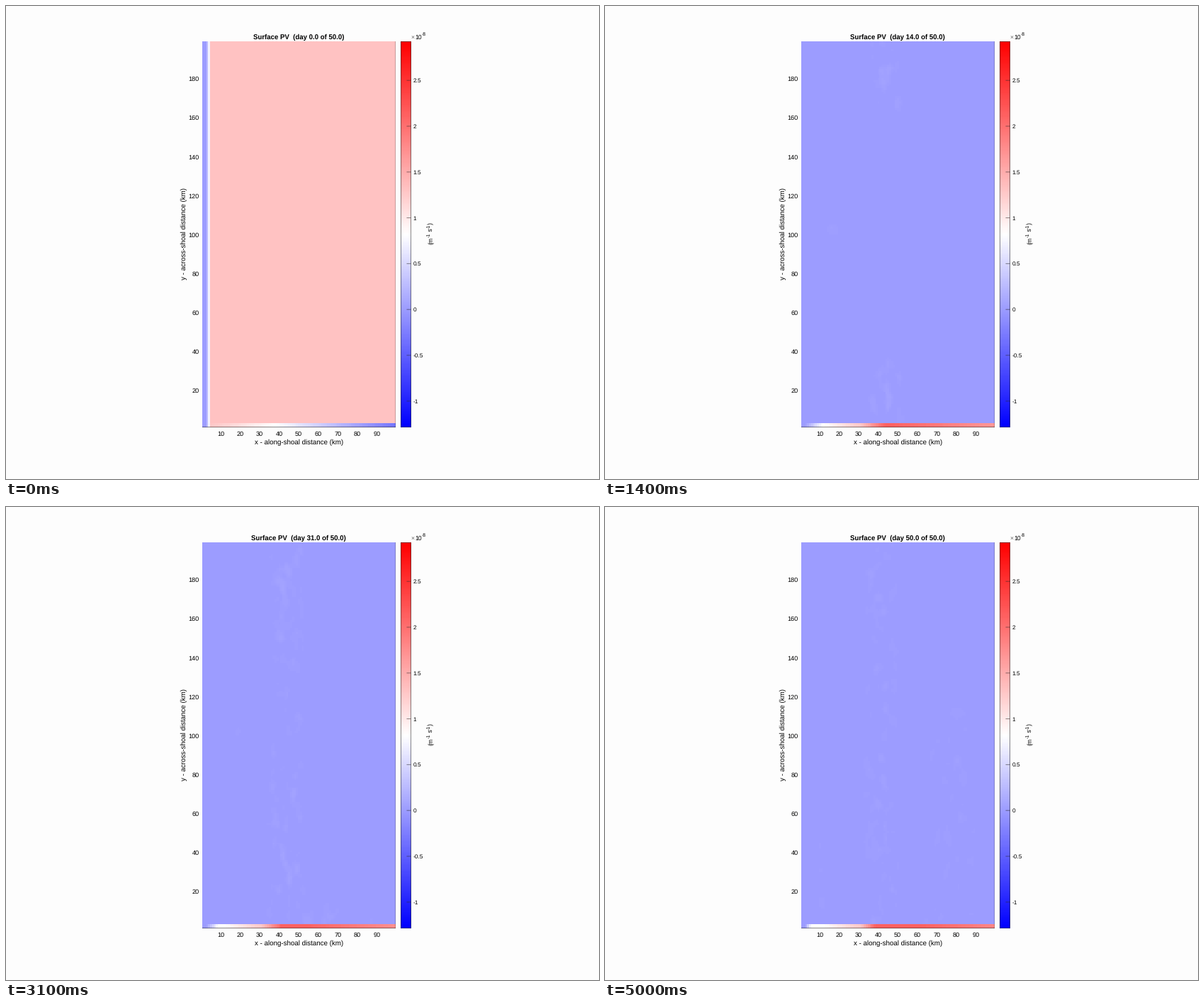
A matplotlib script for the animation above (5.1 s loop, 837 by 669 pixels).

```python
import numpy as np
import matplotlib.pyplot as plt
from matplotlib.animation import FuncAnimation
from matplotlib.colors import LinearSegmentedColormap

W, H, DPI = 837, 669, 64
PT = 72 / DPI                      # points per pixel
DAYS = 50
VMIN, VMAX = -1.289, 2.924
LEFT, RIGHT, TOP, BOTTOM = 277, 550, 50, 596
BAR_LEFT, BAR_RIGHT = 557, 572
NX, NY = 99, 198                   # 1 km cells

plt.rcParams.update({"font.family": "Liberation Sans", "text.hinting": "none"})
cmap = LinearSegmentedColormap.from_list("bwr", ["#0000ff", "#ffffff", "#ff0000"], 256)

fig = plt.figure(figsize=(W / DPI, H / DPI), dpi=DPI, facecolor="#fdfdfd")
ax = fig.add_axes([0, 0, 1, 1])
ax.axis("off")


def label(x, y, text, size, ha="center", rot=0, color="black", weight="normal"):
    """Text anchored on its baseline, sized in pixels."""
    return ax.text(x, y, text, fontsize=size * PT, ha=ha, va="baseline", color=color,
                   rotation=rot, rotation_mode="anchor", weight=weight)


def line(xs, ys, alpha=0.55):
    ax.plot(xs, ys, color="#262626", lw=PT, alpha=alpha, snap=False,
            solid_capstyle="butt", solid_joinstyle="miter")


def heat(data, left, right):
    return ax.imshow(data, cmap=cmap, vmin=VMIN, vmax=VMAX, aspect="auto",
                     interpolation="nearest", extent=(left, right, BOTTOM, TOP))


# --- data -----------------------------------------------------------------
km = np.arange(NX) + 0.5
north = NY + 0.5 - np.arange(NY)[:, None]     # y in km, first row on top


def ramp(x, start, end):
    return np.clip((x - start) / (end - start), 0, 1)


def mix(a, b, t):
    return a + (b - a) * t


def blob(x, y, sx, sy):
    return np.exp(-((km - x) / sx) ** 2 - ((north - y) / sy) ** 2)


def initial_rise():
    return ramp(km, 1.5, 4.5) ** 1.5


def edge_row(day):
    """Values along the southern edge: a slope that turns into a red plateau."""
    if day == 0:
        return initial_rise() * (1.32 - 1.65 * (km / NX) ** 1.2)
    late = ramp(day, 14, DAYS)
    shore = ramp(km, 2, mix(11, 5, late))
    young = 0.82 + 0.16 * ramp(km, 10, 15) - 1.16 * ramp(km, 25, NX)
    peak = mix(0.55, 0.81, ramp(day, 7, 14))
    mature = (0.82 + 0.5 * ramp(km, 11, 32)
              + peak * ramp(km, 31, mix(43, 38, late))
              - mix(0.46, 0.32, late) * ramp(km, mix(45, 60, late), NX))
    return shore * mix(young, mature, 1 - np.exp(-0.7 * (day - 1)))


def smooth_noise(rng, sx, sy):
    field = rng.standard_normal((NY, NX))
    t = np.arange(-6, 7)
    for axis, s in ((1, sx), (0, sy)):
        kernel = np.exp(-0.5 * (t / s) ** 2)
        field = np.apply_along_axis(np.convolve, axis, field, kernel, mode="same")
    return field / field.std()


rng = np.random.default_rng(7)
WAVES = [smooth_noise(rng, 1.1, 1.9) for _ in range(4)]


def eddies(day):
    """Faint patches that grow from both ends into a band, then spread east."""
    a, b = 0.45 * day, 0.29 * day
    noise = (WAVES[0] * np.cos(a) + WAVES[1] * np.sin(a)
             + WAVES[2] * np.cos(b) + WAVES[3] * np.sin(b)) / np.sqrt(2)
    late = ramp(day, 28, DAYS)
    band = np.exp(-((km - 43.5 + 2.5 * late) / 8.5) ** 4)
    reach = 100 * ramp(day, 8, 24)
    end = np.minimum(north, 199 - north)
    mask = band * np.clip((reach - end) / 15 + 0.3, 0, 1) * ramp(day, 8, 13) * (1 - 0.35 * late)
    mask += 0.9 * ramp(day, 18, 25) * (1 - 0.6 * late) * blob(70, 4, 20, 8)
    mask += 0.6 * ramp(day, 9, 14) * (1 - late) * blob(18, 105, 8, 5)
    mask += 0.5 * late * (blob(78, 70, 12, 55) + blob(11, 30, 3, 32))
    return 0.026 * np.clip(noise, 0, 2.5) * np.clip(mask, 0, 1)


def surface(day):
    if day == 0:
        field = np.tile(1.32 * initial_rise(), (NY, 1))
    else:
        decay = np.exp(-1.8 * (day - 1))
        front = 0.165 * ramp(km - 3 * (day - 1), 12, 41) ** 0.9 + 0.02 * ramp(km, 40, NX)
        # patch of weaker values, soft to the north and south
        patch = ((km > 13) & (km < 29)) / (1 + np.exp((np.abs(north - 101) - 9) / 1.4))
        field = decay * mix(front, -0.015, patch) + eddies(day)
    field[-2:] = edge_row(day)
    return field


# --- static parts -----------------------------------------------------------
image = heat(surface(0), LEFT, RIGHT)
heat(np.linspace(VMAX, VMIN, 256)[:, None], BAR_LEFT, BAR_RIGHT)
ax.set_xlim(0, W)
ax.set_ylim(H, 0)

line([LEFT, RIGHT], [BOTTOM - 0.5] * 2)
line([RIGHT - 0.5] * 2, [TOP, BOTTOM], 0.25)
x0, x1, y0, y1 = BAR_LEFT + 0.5, BAR_RIGHT - 0.5, TOP + 0.5, BOTTOM - 0.5
line([x0, x1, x1, x0, x0], [y0, y0, y1, y1, y0])

for v in range(10, 100, 10):
    label(303 + (v - 10) * 2.753, 608, str(v), 9.1)
for v in range(20, 200, 20):
    label(272.6, 546.8 - (v - 20) * 2.753, str(v), 9.1, "right")
for v in np.arange(-1, 2.6, 0.5):
    y = 429.2 - 129.6 * v
    line([565.5, 571.5], [y, y])
    label(574.5, y + 3, f"{v:g}", 8.4, "left")

label(413.5, 620, "x - along-shoal distance (km)", 9.8)
label(254, 322.3, "y - across-shoal distance (km)", 9.8, rot=90)

label(571.3, 46.5, "×", 8.6, "left", color="#666666")
label(577.2, 46.5, "10", 8.6, "left")
label(587, 42.3, "-8", 6.8, "left")

# units, written upwards with raised exponents
y = 337.2
for text, raised, advance in (("(m", 0, 9.8), ("-1", 1, 6), (" s", 0, 6.5),
                              ("-1", 1, 6), (")", 0, 0)):
    label(602.3 - 4 * raised, y, text, 8.6 - 1.7 * raised, "left", rot=90)
    y -= advance

title = label(413.2, 47, "", 9.65, weight="bold")


def update(day):
    image.set_data(surface(day))
    title.set_text(f"Surface PV  (day {day:.1f} of {DAYS:.1f})")
    return image, title


anim = FuncAnimation(fig, update, frames=DAYS + 1, interval=100, repeat=True,
                     repeat_delay=0, blit=False)
plt.show()
```
